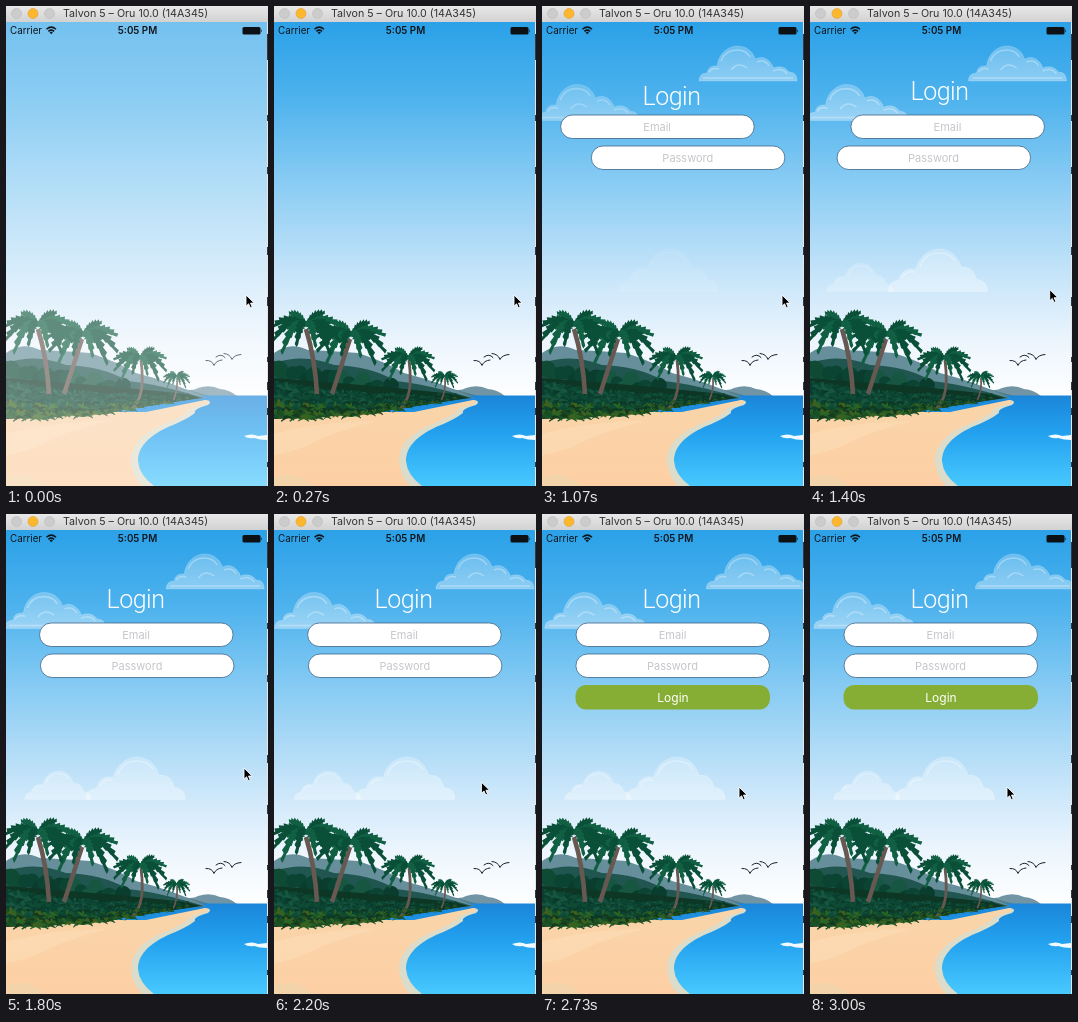
Animation of 262x480 px, one loop 3070 ms. Source, as an HTML page:

```html
<!DOCTYPE html>
<html lang="en">
<head>
<meta charset="utf-8">
<title>Login</title>
<style>
  html, body { margin: 0; width: 100%; height: 100%; overflow: hidden; background: #fff; }
  svg { display: block; width: 262px; height: 480px; }
  text { font-family: Inter, "Liberation Sans", sans-serif; }
  .mid { text-anchor: middle; }
  .status { font-size: 9.8px; fill: #10161c; }
  .hint { font-size: 11px; fill: #c6c6cb; }
  .heading { font: 300 25px Roboto, Inter, sans-serif; letter-spacing: -.5px; fill: #fff; }
  .field { fill: #fff; stroke: #3d6488; stroke-width: .8; }
  .cloud path { fill: url(#mist); stroke: #fff; stroke-opacity: .22; stroke-width: .8; }
  .cloud .fold { fill: none; stroke-opacity: .3; stroke-width: 1.5; }
  .birds { fill: none; stroke: #17212b; stroke-width: 1; stroke-linecap: round; }
</style>
</head>
<body>
<svg viewBox="0 0 262 480">
  <defs>
    <linearGradient id="sky" gradientUnits="userSpaceOnUse" x1="0" y1="16" x2="0" y2="392">
      <stop offset="0" stop-color="#2ba1e8"/>
      <stop offset=".2" stop-color="#4db2ed"/>
      <stop offset=".4" stop-color="#82c9f3"/>
      <stop offset=".55" stop-color="#a8d8f6"/>
      <stop offset=".7" stop-color="#cce7fa"/>
      <stop offset=".85" stop-color="#ecf5fd"/>
      <stop offset="1" stop-color="#fff"/>
    </linearGradient>
    <linearGradient id="sea" x1="0" y1="0" x2="0" y2="1">
      <stop offset="0" stop-color="#1b86d9"/>
      <stop offset=".4" stop-color="#22a0ee"/>
      <stop offset="1" stop-color="#48c9ff"/>
    </linearGradient>
    <linearGradient id="sand" x1="0" y1="0" x2="0" y2="1">
      <stop offset="0" stop-color="#f9d5aa"/>
      <stop offset="1" stop-color="#fecfa4"/>
    </linearGradient>
    <linearGradient id="mist" x1="0" y1="0" x2="0" y2="1">
      <stop offset="0" stop-color="#fff" stop-opacity=".26"/>
      <stop offset="1" stop-color="#fff" stop-opacity=".38"/>
    </linearGradient>
    <linearGradient id="bar" x1="0" y1="0" x2="0" y2="1">
      <stop offset="0" stop-color="#e9e8e9"/>
      <stop offset="1" stop-color="#d3d2d3"/>
    </linearGradient>
    <clipPath id="screen"><path d="M0 16H261V480H0Z"/></clipPath>
  </defs>

  <g clip-path="url(#screen)">
    <g id="scene">
      <path d="M0 16H262V480H0Z" fill="url(#sky)"/>
      <path d="M120 376Q150 372 172 382Q186 386 192 382Q204 378 214 383Q224 384 231 390H120Z" fill="#7295a6"/>
      <path d="M150 386Q172 380 190 386L208 391H150Z" fill="#527f88"/>
      <path d="M110 389.5H262V480H110Z" fill="url(#sea)"/>
      <path d="M238 430Q246 427 252 430L262 429V434Q254 434 248 432Q242 433 238 430Z" fill="#eefaff"/>
      <path d="M0 408H150L200 394Q207 395 202 399Q187 403 189 407Q180 414 162 421C141 431 132 442 132 455Q133 469 148 480H0Z" fill="#dcdccb"/>
      <path d="M0 406H140L199 394Q205 395 199 398Q182 402 182 406Q174 412 156 419C134 429 125 441 125 455Q126 470 136 480H0Z" fill="url(#sand)"/>
      <path d="M0 428Q42 416 102 415Q60 425 30 441Q14 447 0 449Z" fill="#fee0b9" opacity=".5"/>
      <path d="M0 472Q20 462 40 480H0Z" fill="#f3d3a9"/>
      <g id="jungle"></g>
      <g class="birds">
        <path d="M200 354.5Q206 354 208 359.5Q210 354.5 216 354"/>
        <path d="M210 351Q215 347 219 351.5"/>
        <path d="M218 347.5Q224 348 226 353.5Q228 349 235 348.5"/>
      </g>
    </g>

    <g id="clouds"></g>
    <text id="heading" class="heading mid" x="129.5" y="94">Login</text>
    <g id="email">
      <rect class="field" x="34" y="109" width="193.5" height="23.5" rx="11.7"/>
      <text class="hint mid" x="130.5" y="124.5">Email</text>
    </g>
    <g id="password">
      <rect class="field" x="34" y="140" width="193.5" height="23.5" rx="11.7"/>
      <text class="hint mid" x="130.5" y="155.5">Password</text>
    </g>
    <g id="button">
      <rect x="33.5" y="171" width="194.5" height="24.5" rx="10.5" fill="#87ae34"/>
      <text class="mid" x="131" y="187.5" font-size="12" fill="#fff">Login</text>
    </g>

    <text class="status" x="4" y="28">Carrier</text>
    <text class="status mid" x="131.5" y="28" font-weight="600">5:05 PM</text>
    <g fill="none" stroke="#10161c" stroke-width="1.5">
      <path d="M40.5 23.2Q45.2 19 50 23.2M42.4 25.4Q45.2 22.9 48.1 25.4"/>
      <path d="M43.6 26.4Q45.2 25 46.9 26.4L45.2 28.2Z" fill="#10161c" stroke="none"/>
    </g>
    <rect x="236.5" y="21" width="18" height="7.6" rx="1.6" fill="#0c1116"/>
    <path d="M255.2 23.2q1.6 1.5 0 3.2z" fill="#0c1116"/>
  </g>

  <path d="M0 0H262V16H0Z" fill="url(#bar)"/>
  <circle cx="10.5" cy="7.5" r="5" fill="#cdcccd" stroke="#bbb" stroke-width=".6"/>
  <circle cx="27" cy="7.5" r="5" fill="#fdb72f" stroke="#e0a02c" stroke-width=".6"/>
  <circle cx="43.5" cy="7.5" r="5" fill="#cdcccd" stroke="#bbb" stroke-width=".6"/>
  <text class="mid" x="129.5" y="11.2" font-size="10.7" fill="#333">Talvon 5 – Oru 10.0 (14A345)</text>

  <path d="M261.5 16V480" stroke="#e4e6e8"/>
  <path d="M261.5 28V54M261.5 109v6M261.5 161v7M261.5 241v8M261.5 291v9M261.5 351v5M261.5 376v8M261.5 402v7M261.5 456v5" stroke="#35383c"/>

  <path id="pointer" d="M0 0V11.2L2.6 8.8L4.3 12.8L6.2 12L4.5 8.1H8.2Z" fill="#000" stroke="#fff" stroke-width=".9"/>
</svg>

<script>
const LOOP = 3070, STEPS = 46;
const el = id => document.getElementById(id);
const clamp = v => Math.min(1, Math.max(0, v));
const ease = v => v * v * (3 - 2 * v);
const fade = (t, from, span) => ease(clamp((t - from) / span));

let seed = 11;
const rnd = (a, b) => {
  seed = (seed * 16807) % 2147483647;
  return a + (b - a) * seed / 2147483647;
};
const pick = list => list[Math.floor(rnd(0, list.length))];
const fill = (d, color) => `<path d="${d}" fill="${color}"/>`;

// Arched, tapered leaf with saw-toothed edges.
function frond(x, y, dx, dy, lift, width, color) {
  const n = 8, sides = [[], []];
  for (let i = 0; i < n; i++) {
    [.04, .5].forEach((shift, tooth) => {
      const t = (i + shift) / n;
      const tx = dx, ty = 2 * dy * t - 4 * lift * (1 - 2 * t);
      const k = width * Math.sin(Math.PI * (.12 + .82 * t)) * (tooth ? 1 : .6) / Math.hypot(tx, ty);
      const ahead = tooth ? .07 : 0;
      const px = x + dx * (t + ahead), py = y + dy * t * t - 4 * lift * t * (1 - t) + dy * ahead;
      sides[0].push([px - ty * k, py + tx * k]);
      sides[1].unshift([px + ty * k, py - tx * k]);
    });
  }
  const outline = [...sides[0], [x + dx, y + dy], ...sides[1]];
  return fill('M' + outline.map(p => p.map(v => v.toFixed(1)).join(' ')).join('L') + 'Z', color);
}

const LEAVES = [[-.5, -.36], [.55, -.38], [-1, .06], [1, .02], [-.98, .5], [1, .52],
                [-.7, .85], [.7, .88], [-.28, .62], [.28, .66]];

function palm(x, y, r, trunk, width) {
  const stem = `<path d="${trunk}" fill="none" stroke="#675852" stroke-width="${width}"/>`;
  return stem + LEAVES.map(([dx, dy], i) =>
    frond(x, y, dx * r, dy * r, r * .2, r * .15, i % 3 ? '#0a4f38' : '#116043')).join('');
}

function tuft(x, y, r, colors) {
  let s = '';
  for (let i = 0; i < 7; i++) {
    const a = Math.PI * (1 + i / 6) + rnd(-.15, .15);
    s += frond(x, y, Math.cos(a) * r, Math.sin(a) * r * .8 + r * .2, r * .2, r * .16, pick(colors));
  }
  return s;
}

const DEEP = ['#0a3d2e', '#0f4a35', '#0b4433', '#175640'];
const LUSH = ['#1c4a20', '#2c6425', '#14391c', '#43601f', '#1a5228'];
const beach = x => 414 - .0006 * x * x;

function bushes(rise, colors) {
  let s = '';
  for (let x = -3; x < 188; x += 8) {
    const size = 1 - x / 215;
    s += tuft(x, beach(x) - rise * size + rnd(-2, 1), 15 * size, colors);
  }
  return s;
}

function jungle() {
  let s = fill('M0 347Q16 335 34 344Q60 345 84 347Q112 356 130 367Q166 376 200 392L120 400H0Z', '#668f9b');
  s += fill('M0 357Q30 347 60 359Q96 360 122 375Q152 378 198 392L150 398L0 410Z', '#215650');
  for (let x = -2; x < 122; x += 7) {
    const y = 367 + x * .13 + rnd(-5, 4);
    s += `<circle cx="${x}" cy="${y}" r="${rnd(6, 9)}" fill="${pick(DEEP)}"/>`;
  }
  s += fill('M0 372L112 381L180 388L194 392L150 399Q100 407 60 410L0 413Z', '#0d3624');
  s += bushes(31, DEEP) + bushes(21, DEEP);
  s += palm(170.5, 371, 13, 'M171 372Q172 385 167 395', 1.7);
  s += palm(134, 353, 26, 'M135 354Q138 378 134 390Q131 398 126 403', 2.8);
  s += palm(77, 330, 34, 'M76 333Q68 358 58 388', 4.4);
  s += palm(32, 320, 34, 'M32 323Q41 352 43 388', 4.6);
  s += bushes(11, [...DEEP, ...LUSH]) + bushes(1, LUSH);
  return s;
}

const BIG = {
  body: 'M0 35Q0 27 8 27Q9 19 18 20C20 6 30 0 38 0C48 0 54 6 56 13Q64 9 70 15Q74 19 74 22Q84 18 90 26Q98 26 98 35Z',
  fold: 'M22 15Q26 4 38 4Q47 4 51 11M10 26Q13 21 20 23M58 16Q66 13 70 20M74 25Q83 21 88 28M32 24Q39 15 48 22M4 32H94'
};
const PUFF = {
  body: 'M0 42Q0 32 10 31Q14 17 27 20C31 6 41 0 50 0C62 0 69 8 72 18Q84 17 87 30Q98 31 98 42Z',
  fold: 'M31 18Q36 4 50 4Q61 4 66 12M14 28Q18 21 26 23'
};
const CLOUDS = [
  { shape: BIG, x: 152.5, y: 40, scale: 1, from: 500 },
  { shape: BIG, x: -9, y: 78.5, scale: 1.03, from: 700 },
  { shape: PUFF, x: 72.5, y: 243, scale: 1.01, from: 900 },
  { shape: PUFF, x: 10.7, y: 257, scale: .68, from: 1100 },
];

el('jungle').innerHTML = jungle();
el('clouds').innerHTML = CLOUDS.map(({ shape }) =>
  `<g class="cloud"><path d="${shape.body}"/><path class="fold" d="${shape.fold}"/></g>`).join('');
const clouds = [...el('clouds').children];

// Spring from 1 to 0, released at 265 ms; ratio below 1 overshoots.
function spring(t, ratio, freq) {
  const s = Math.max(0, t - 265) / 1000;
  const damp = ratio * freq, wave = freq * Math.sqrt(1 - ratio * ratio);
  return Math.exp(-damp * s) * (Math.cos(wave * s) + damp / wave * Math.sin(wave * s));
}

const PATH = [[0, 240, 289], [1270, 240, 289], [1800, 238, 254], [2400, 197, 273], [LOOP, 197, 273]];
function pointerAt(t) {
  const i = PATH.findIndex((p, k) => k && t <= p[0]);
  const [t0, x0, y0] = PATH[i - 1], [t1, x1, y1] = PATH[i];
  const k = ease((t - t0) / (t1 - t0));
  return [x0 + (x1 - x0) * k, y0 + (y1 - y0) * k];
}

const move = (node, x, y, scale = 1) =>
  node.setAttribute('transform', `translate(${x} ${y}) scale(${scale})`);

function draw(t) {
  el('scene').setAttribute('opacity', clamp(.65 + t / 570));
  CLOUDS.forEach((c, i) => {
    move(clouds[i], c.x + t * .0043, c.y, c.scale);
    clouds[i].setAttribute('opacity', fade(t, c.from, 500));
  });
  move(el('heading'), 0, -160 * spring(t, .7, 6.8));
  const swing = 262 * spring(t, .5, 6.46);
  move(el('email'), swing, 0);
  move(el('password'), -swing, 0);
  el('button').setAttribute('opacity', fade(t, 2210, 510));
  move(el('pointer'), ...pointerAt(t));
}

const start = performance.now();
function tick() {
  const t = (performance.now() - start) % LOOP;
  // The screen refreshes at about 15 steps per second.
  const step = Math.min(STEPS - 1, Math.floor(t * STEPS / LOOP + .1));
  draw(step * LOOP / STEPS);
  requestAnimationFrame(tick);
}
tick();
</script>
</body>
</html>
```
